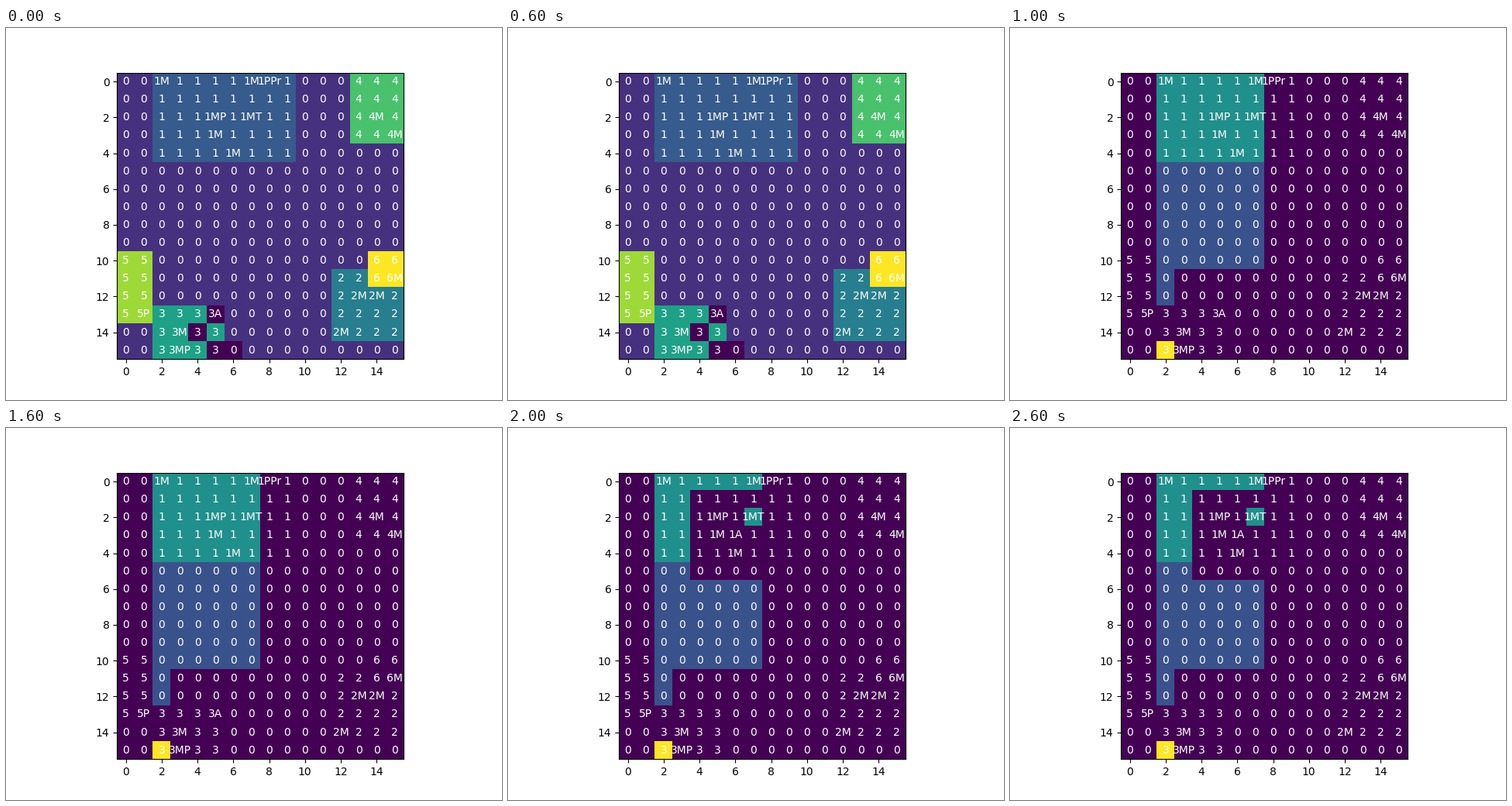
Write a matplotlib script that moves like this. It is 640 px wide and 480 px high and loops after 3000 ms.

```python
import matplotlib.pyplot as plt
import numpy as np
from matplotlib.animation import FuncAnimation

N = 16

# Rooms are numbered from 1; the rest of the floor is 0.
ROOMS = [
    np.s_[:5, 2:10], np.s_[11:15, 12:], np.s_[13:, 2:6],
    np.s_[:4, 13:], np.s_[10:14, :2], np.s_[10:12, 14:],
]
floor = np.zeros((N, N), int)
for number, area in enumerate(ROOMS, start=1):
    floor[area] = number

# Objects and the (row, column) cells they stand on
OBJECTS = {
    "M": [(0, 2), (0, 7), (2, 14), (3, 5), (3, 15), (4, 6),
          (11, 15), (12, 13), (12, 14), (14, 3), (14, 12)],
    "MP": [(2, 5), (15, 3)],
    "MT": [(2, 7)],
    "PPr": [(0, 8)],
    "P": [(13, 1)],
}
names = np.full((N, N), "", dtype=object)
for kind, cells in OBJECTS.items():
    for cell in cells:
        names[cell] = kind

START, END = (13, 5), (3, 6)


def room_view():
    """Every room in its own colour, with marked cells below the floor."""
    view = floor.copy()
    view[13, 5] = view[14, 4] = view[15, 5:7] = -1
    return view


def wide_plan():
    """A wide search area, brighter in the first room, and a goal."""
    plan = np.zeros_like(floor)
    plan[:11, 2:8] = 1
    plan[11:13, 2] = 1
    plan[floor == 1] *= 2
    plan[15, 2] = 4
    return plan


def narrow_plan():
    """The wide plan with a block cleared around one kept cell."""
    plan = wide_plan()
    plan[1:6, 4:8] = 0
    plan[2, 7] = 2
    return plan


SCENES = [(room_view(), START), (wide_plan(), START), (narrow_plan(), END)]

fig, ax = plt.subplots(figsize=(6.4, 4.8), dpi=100)
image = ax.imshow(SCENES[0][0])
labels = {
    (r, c): ax.text(c, r, "", ha="center", va="center", color="w")
    for r, c in np.ndindex(N, N)
}


def update(step):
    view, agent = SCENES[step]
    image.set_data(view)
    image.autoscale()
    for cell, label in labels.items():
        mark = "A" if cell == agent else ""
        label.set_text(f"{floor[cell]}{names[cell]}{mark}")
    return [image, *labels.values()]


anim = FuncAnimation(fig, update, frames=len(SCENES), interval=1000,
                     repeat=True, repeat_delay=0)
plt.show()
```
